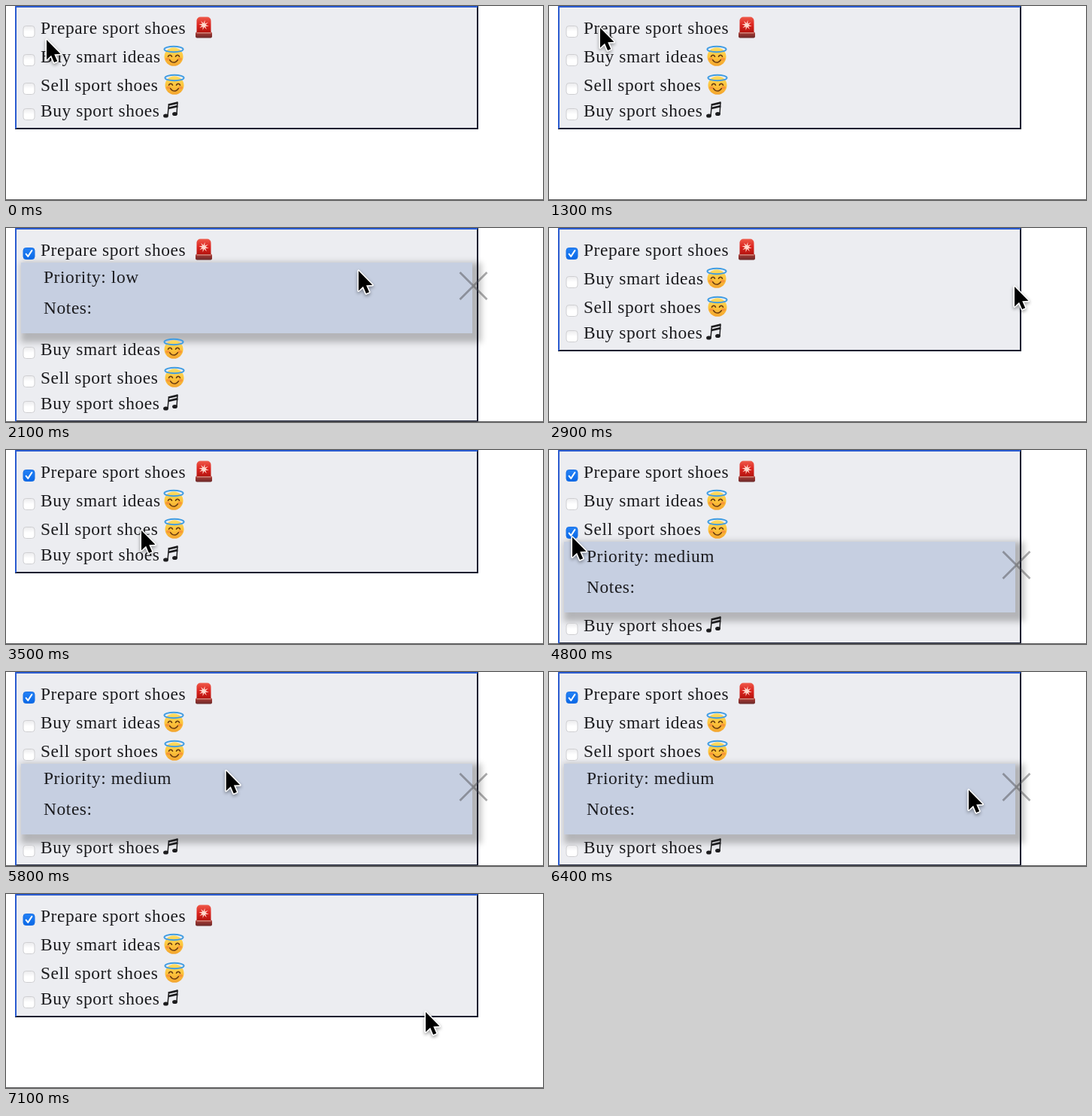
An HTML page with a canvas that plays this animation: 714x258 px, repeating every 7.2 s.

```html
<!DOCTYPE html>
<html lang="en">
<head>
<meta charset="utf-8">
<title>Todo list</title>
<style>
  html, body { margin: 0; width: 100%; height: 100%; overflow: hidden; background: #fff; }
  canvas { display: block; width: 714px; height: 258px; }
</style>
</head>
<body>
<canvas id="stage" width="714" height="258"></canvas>
<script>
const ctx = document.getElementById('stage').getContext('2d');
const LOOP = 7200, STEP = 100;
const FIRST_ROW = 34, ROW = 38, PANEL_ROOM = 94, FRAME_END = 164;

const items = [
  { label: 'Prepare sport shoes', icon: siren, iconX: 263 },
  { label: 'Buy smart ideas', icon: angel, iconX: 223 },
  { label: 'Sell sport shoes', icon: angel, iconX: 224 },
  { label: 'Buy sport shoes', icon: notes, iconX: 219 }
];

const panels = [
  { row: 0, priority: 'low', from: 1500, to: 2900 },
  { row: 2, priority: 'medium', from: 4600, to: 6700 }
];

const checks = [
  { row: 0, from: 1500, to: LOOP },
  { row: 2, from: 4600, to: 5300 }
];

// Pointer stops, each reached by a glide that slows down
const start = { x: 54, y: 45 };
const glides = [
  { from: 100, to: 800, x: 40, y: 35 },
  { from: 900, to: 1300, x: 68, y: 29 },
  { from: 1300, to: 1500, x: 40, y: 32 },
  { from: 1700, to: 2500, x: 588, y: 64 },
  { from: 2500, to: 2700, x: 619, y: 78 },
  { from: 3100, to: 3500, x: 180, y: 107 },
  { from: 3800, to: 4500, x: 31, y: 116 },
  { from: 5700, to: 6100, x: 589, y: 149 },
  { from: 6200, to: 6400, x: 558, y: 157 }
];

const active = (span, t) => t >= span.from && t < span.to;
const rowY = row => FIRST_ROW + ROW * row - (items[row].icon === notes ? 4 : 0);
const clamp = k => Math.min(1, Math.max(0, k));
const easeOut = k => 1 - Math.pow(1 - k, 2.2);

function pointerAt(t) {
  return glides.reduce((p, g) => {
    const k = easeOut(clamp((t - g.from) / (g.to - g.from)));
    return { x: p.x + (g.x - p.x) * k, y: p.y + (g.y - p.y) * k };
  }, start);
}

function rect(x, y, w, h, color) {
  ctx.fillStyle = color;
  ctx.fillRect(x, y, w, h);
}

function roundRect(x, y, w, h, radius, color) {
  ctx.beginPath();
  ctx.roundRect(x, y, w, h, radius);
  ctx.fillStyle = color;
  ctx.fill();
}

function ellipse(x, y, rx, ry, color) {
  ctx.beginPath();
  ctx.ellipse(x, y, rx, ry, 0, 0, 7);
  ctx.fillStyle = color;
  ctx.fill();
}

function stroke(color, width) {
  ctx.strokeStyle = color;
  ctx.lineWidth = width;
  ctx.stroke();
}

function trace(points) {
  ctx.beginPath();
  points.forEach(([x, y]) => ctx.lineTo(x, y));
}

function shape(points, color) {
  trace(points);
  ctx.closePath();
  ctx.fillStyle = color;
  ctx.fill();
}

function line(points, color, width) {
  trace(points);
  stroke(color, width);
}

function arc(x, y, r, from, to, color, width) {
  ctx.beginPath();
  ctx.arc(x, y, r, from * Math.PI, to * Math.PI);
  stroke(color, width);
}

function gradient(y0, y1, ...colors) {
  const g = ctx.createLinearGradient(0, y0, 0, y1);
  colors.forEach((c, i) => g.addColorStop(i / (colors.length - 1), c));
  return g;
}

function shadow(color, blur, dx, dy) {
  ctx.shadowColor = color;
  ctx.shadowBlur = blur;
  ctx.shadowOffsetX = dx;
  ctx.shadowOffsetY = dy;
}

function text(str, x, y) {
  ctx.font = '23.4px "Liberation Serif", serif';
  ctx.letterSpacing = '0.6px';
  ctx.fillStyle = '#1b1b1e';
  ctx.fillText(str, x, y);
}

// Icons are drawn around their own centre
function siren() {
  roundRect(-11, 6, 22, 8, 2, gradient(6, 14, '#b03a34', '#6b2a2a'));
  roundRect(-9.5, -14, 19, 21, [5, 5, 1, 1], gradient(-14, 7, '#ee5a4a', '#dc241f', '#b3140f'));
  rect(-9.5, 6.5, 19, 1.5, '#cf8379');
  const star = Array.from({ length: 16 }, (_, i) => {
    const r = i % 2 ? 2.5 : 7, a = i * Math.PI / 8 + 0.2;
    return [r * Math.cos(a), -3 + r * Math.sin(a)];
  });
  shape(star, '#ffd9cd');
}

function angel() {
  const ink = '#6b3c10';
  ellipse(0, 1, 12.5, 12.3, gradient(-11, 13, '#ffdc62', '#fdc53c', '#f3a52f'));
  ctx.lineCap = 'round';
  for (const side of [-1, 1]) {
    ellipse(side * 8, 4, 2.8, 2, 'rgba(244,115,55,.5)');
    arc(side * 5, 1.5, 2.6, 1.1, 1.9, ink, 1.6);
  }
  arc(0, 2.5, 6, 0.15, 0.85, ink, 1.6);
  ctx.beginPath();
  ctx.ellipse(0, -9, 12.6, 3.8, 0, 0, 7);
  stroke('#3f9ce2', 1.9);
}

function notes() {
  const ink = '#1c1c1e';
  ellipse(-6.5, 7.5, 3.4, 2.6, ink);
  ellipse(5.5, 5, 3.4, 2.6, ink);
  line([[-4, 7.5], [-2.5, -8.5]], ink, 1.5);
  line([[8, 5], [9, -11]], ink, 1.5);
  for (const y of [-7, -2.5]) line([[-3, y], [9.3, y - 2.8]], ink, 2.8);
}

function checkbox(y, on) {
  ctx.save();
  ctx.translate(30.5, y);
  roundRect(-7.5, -7.5, 15, 15, 3.5,
    on ? gradient(-8, 8, '#2583f7', '#0967e6') : gradient(-8, 8, '#e9e9eb', '#fff', '#fff'));
  stroke(on ? '#1a70e4' : '#cfcfd2', 1);
  if (on) {
    ctx.lineCap = ctx.lineJoin = 'round';
    line([[-3.8, 0.6], [-1.2, 3.8], [3.8, -4]], '#fff', 2.1);
  }
  ctx.restore();
}

function drawPanel({ row, priority }) {
  const top = rowY(row) + 12, spread = 6, away = 1000;
  ctx.save();
  // The caster stays off stage so that only its shadow shows
  shadow('rgba(0,0,0,.24)', 8, away + spread, spread);
  rect(20 - spread - away, top - spread, 600 + 2 * spread, PANEL_ROOM + 2 * spread, '#000');
  ctx.restore();
  rect(20, top, 600, PANEL_ROOM, '#c6cfe1');
  text('Priority: ' + priority, 50, top + 27);
  text('Notes:', 50, top + 68);

  const x = 621.5, y = top + 31, r = 18;
  trace([[x - r, y - r], [x + r, y + r]]);
  ctx.moveTo(x - r, y + r);
  ctx.lineTo(x + r, y - r);
  stroke('rgba(75,75,78,.48)', 2.8);
}

function drawFrame(bottom) {
  const blue = '#2a5bd0', navy = '#11182f';
  rect(12, 0, 616, bottom, navy);
  rect(12, 0, 615, bottom - 1, blue);
  rect(14, 2, 613, bottom - 3, navy);
  rect(14, 2, 612, bottom - 4, '#ecedf1');
}

function drawPointer({ x, y }) {
  const size = 1.65;
  const arrow = [[0, 0], [0, 16], [3.7, 12.6], [6.1, 18.2], [8.6, 17.1], [6.2, 11.6], [11.2, 11.4]]
    .map(([px, py]) => [x + px * size, y + py * size]);
  ctx.save();
  ctx.lineJoin = 'round';
  shadow('rgba(0,0,0,.4)', 4, 0, 2);
  trace(arrow);
  ctx.closePath();
  stroke('#fff', 3.2);
  ctx.restore();
  shape(arrow, '#000');
}

function draw(t) {
  const open = panels.find(p => active(p, t));
  rect(0, 0, 714, 258, '#fff');
  drawFrame(FRAME_END + (open ? PANEL_ROOM : 0));
  rect(0, 257, 714, 1, '#5a5a5c');
  if (open) drawPanel(open);
  items.forEach((item, row) => {
    const y = rowY(row) + (open && row > open.row ? PANEL_ROOM : 0);
    checkbox(y, checks.some(c => c.row === row && active(c, t)));
    text(item.label, 46, y + 3);
    ctx.save();
    ctx.translate(item.iconX, y - 5.5);
    item.icon();
    ctx.restore();
  });
  drawPointer(pointerAt(t));
}

function tick() {
  const t = performance.now() % LOOP;
  draw(Math.floor(t / STEP) * STEP);
  requestAnimationFrame(tick);
}
tick();
</script>
</body>
</html>
```
